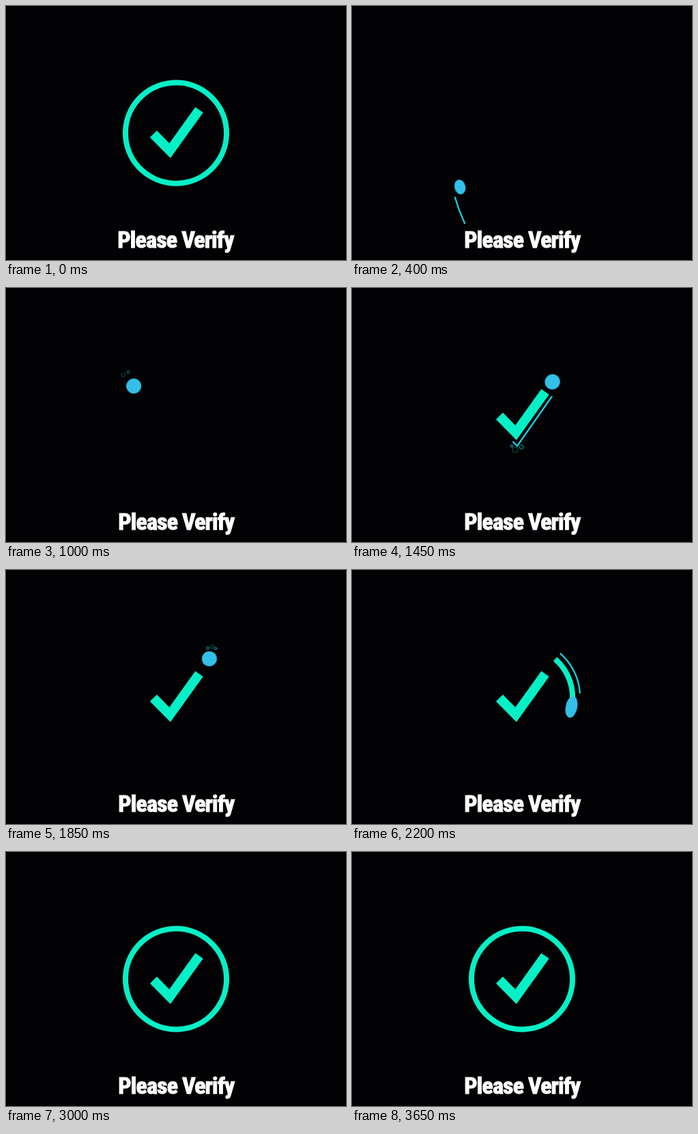
An HTML page for the animation above (3700 ms loop, 498 by 373 pixels).

```html
<!DOCTYPE html>
<html lang="en">
<head>
<meta charset="utf-8">
<title>Please Verify</title>
<style>
  @property --head { syntax: "<number>"; inherits: false; initial-value: 0; }
  @property --tail { syntax: "<number>"; inherits: false; initial-value: 0; }

  :root {
    --green: #05f0c7;
    --blue: #33c0e8;
    --cyan: #17cfe4;
  }
  html, body { margin: 0; width: 100%; height: 100%; overflow: hidden; background: #020103; }
  svg { position: absolute; left: 0; top: 0; width: 498px; height: 373px; }

  /* Every stroke shows only the part between --tail and --head. */
  .line {
    fill: none;
    stroke: var(--green);
    stroke-dasharray: calc((var(--head) - var(--tail)) * 1px) 999px;
    stroke-dashoffset: calc(var(--tail) * -1px);
    animation: 3.7s linear infinite;
  }
  .trail { stroke: var(--cyan); stroke-width: 2.3; }

  .check { stroke-width: 14; animation-name: check; }
  @keyframes check {
    0%, 1.34% { --head: 140; }
    1.35%, 32.43% { --head: 0; }
    33.78% { --head: 34.3; animation-timing-function: cubic-bezier(.333, 1, .667, 1); }
    44.59%, 100% { --head: 139; }
  }

  .ring { stroke-width: 8; animation-name: ring; }
  @keyframes ring {
    0%, 1.34% { --head: 361; }
    1.35%, 50.81% { --head: 0; animation-timing-function: cubic-bezier(.333, 0, .667, 0); }
    63.31% { --head: 180; animation-timing-function: cubic-bezier(.333, 1, .667, 1); }
    75.81%, 100% { --head: 361; }
  }

  .rise { animation-name: rise-head, rise-tail; }
  @keyframes rise-head {
    0%, 8.11% { --head: 0; animation-timing-function: cubic-bezier(.333, .667, .667, 1); }
    21.6%, 100% { --head: 116; }
  }
  @keyframes rise-tail {
    0%, 11% { --tail: 0; }
    21.6%, 100% { --tail: 120; }
  }

  .tick { animation-name: tick-head, tick-tail; }
  @keyframes tick-head {
    0%, 32.9% { --head: 0; }
    34% { --head: 46.7; animation-timing-function: cubic-bezier(.333, .667, .667, 1); }
    39.19%, 100% { --head: 135.7; }
  }
  @keyframes tick-tail {
    0%, 36% { --tail: 0; }
    39.19% { --tail: 36.8; animation-timing-function: cubic-bezier(.333, .667, .667, 1); }
    48%, 100% { --tail: 136; }
  }

  .orbit { animation-name: orbit-head, orbit-tail; }
  @keyframes orbit-head {
    0%, 50% { --head: 0; animation-timing-function: cubic-bezier(.364, 0, .636, 1); }
    91.1%, 100% { --head: 360; }
  }
  @keyframes orbit-tail {
    0%, 59.46% { --tail: 0; animation-timing-function: cubic-bezier(.333, 0, .667, 0); }
    75.14% { --tail: 180; animation-timing-function: cubic-bezier(.333, 1, .667, 1); }
    90.8%, 100% { --tail: 361; }
  }

  .ball {
    position: absolute;
    left: 0;
    top: 0;
    width: 22px;
    height: 22px;
    border-radius: 50%;
    background: var(--blue);
    offset-path: path("M175.4 315 A260 260 0 0 1 153.1 172 A32.2 32.2 0 0 1 187 144 A32.9 32.9 0 0 1 216 188 L240 212.5 L283 152.5 L301 127.5 L297.55 130.65 A74 74 0 0 1 200.45 242.35 A74 74 0 0 1 297.55 130.65");
    offset-rotate: auto;
    animation: travel 3.7s linear infinite, squash 3.7s linear infinite;
  }
  @keyframes travel {
    0%, 8.11% { offset-distance: 0px; animation-timing-function: cubic-bezier(.333, .667, .667, 1); }
    27.03% { offset-distance: 195.1px; animation-timing-function: cubic-bezier(.333, 0, .667, .333); }
    33.78% { offset-distance: 290.4px; animation-timing-function: cubic-bezier(.333, 1, .667, 1); }
    44.59% { offset-distance: 395px; }
    50.81% { offset-distance: 399.7px; animation-timing-function: cubic-bezier(.333, 0, .667, 0); }
    63.31% { offset-distance: 632.2px; animation-timing-function: cubic-bezier(.333, 1, .667, 1); }
    75.81%, 100% { offset-distance: 864.5px; }
  }
  @keyframes squash {
    0%, 4.05% { transform: scale(0); }
    8.11% { transform: scale(.85, .8); }
    12% { transform: scale(1.05, .7); }
    17.57% { transform: scale(.95, .74); }
    27.03% { transform: scale(1); }
    33.78% { transform: scale(1.15, .9); }
    39.19% { transform: scale(1.03, 1); }
    44.59%, 50.81% { transform: scale(1); }
    59.46% { transform: scale(1.45, .78); }
    64% { transform: scale(1.6, .7); }
    70.27% { transform: scale(.93, .52); }
    75%, 100% { transform: scale(0); }
  }

  .bubbles circle {
    fill: none;
    stroke: var(--cyan);
    stroke-width: 1;
    animation: pop 3.7s calc(var(--at) - 3.7s) linear infinite;
  }
  .bubbles .dim { stroke: #0b7a70; }
  @keyframes pop {
    0% { opacity: 1; transform: none; animation-timing-function: cubic-bezier(.333, .667, .667, 1); }
    7% { opacity: .85; animation-timing-function: linear; }
    12.5%, 100% { opacity: 0; transform: translate(var(--x), var(--y)); }
  }

  text {
    font: 900 34px Impact, "Roboto Condensed", Roboto, "Open Sans", sans-serif;
    font-stretch: condensed;
    letter-spacing: -.025em;
    text-anchor: middle;
    fill: #fff;
    stroke: #fff;
    stroke-width: 1.1;
    animation: nudge 3.7s infinite;
  }
  @keyframes nudge {
    0%, 1.34% { transform: translateX(-.9px); }
    1.35%, 100% { transform: none; }
  }
</style>
</head>
<body>
<svg viewBox="0 0 498 373">
  <path class="line ring" pathLength="360" d="M297.55 130.65 A74 74 0 0 1 200.45 242.35 A74 74 0 0 1 297.55 130.65"/>
  <path class="line check" d="M216 188 L240 212.5 L283 152.5"/>
  <path class="line trail rise" d="M165.4 319.7 A271 271 0 0 1 142.2 170.6"/>
  <path class="line trail tick" d="M209 199 L242 232 L293 159"/>
  <path class="line trail orbit" pathLength="360" d="M304.8 122.3 A85 85 0 0 1 193.2 250.7 A85 85 0 0 1 304.8 122.3"/>

  <g class="bubbles" style="--at: .7s">
    <circle class="dim" cx="180" cy="138" r="3" style="--x: -9.5px; --y: -12px"/>
    <circle cx="180" cy="138" r="2" style="--x: -1px; --y: -16.5px"/>
  </g>
  <g class="bubbles" style="--at: 1.25s">
    <circle cx="240" cy="228" r="1.7" style="--x: -9px; --y: 6px"/>
    <circle class="dim" cx="240" cy="228" r="4" style="--x: -2px; --y: 14px"/>
    <circle cx="240" cy="228" r="3" style="--x: 12px; --y: 8px"/>
  </g>
  <g class="bubbles" style="--at: 1.65s">
    <circle cx="301" cy="118" r="2" style="--x: -8px; --y: -5px"/>
    <circle class="dim" cx="301" cy="118" r="2.5" style="--x: 2px; --y: -8px"/>
    <circle cx="301" cy="118" r="1.7" style="--x: 9px; --y: -4px"/>
  </g>

  <text id="label" x="249.3" y="355.2">Please Verify</text>
</svg>
<div class="ball"></div>
<script>
  // Pick a font size that keeps the caption within its line.
  const label = document.getElementById("label");
  const width = label.getComputedTextLength();
  if (width > 172) label.style.fontSize = 34 * 172 / width + "px";
</script>
</body>
</html>
```
